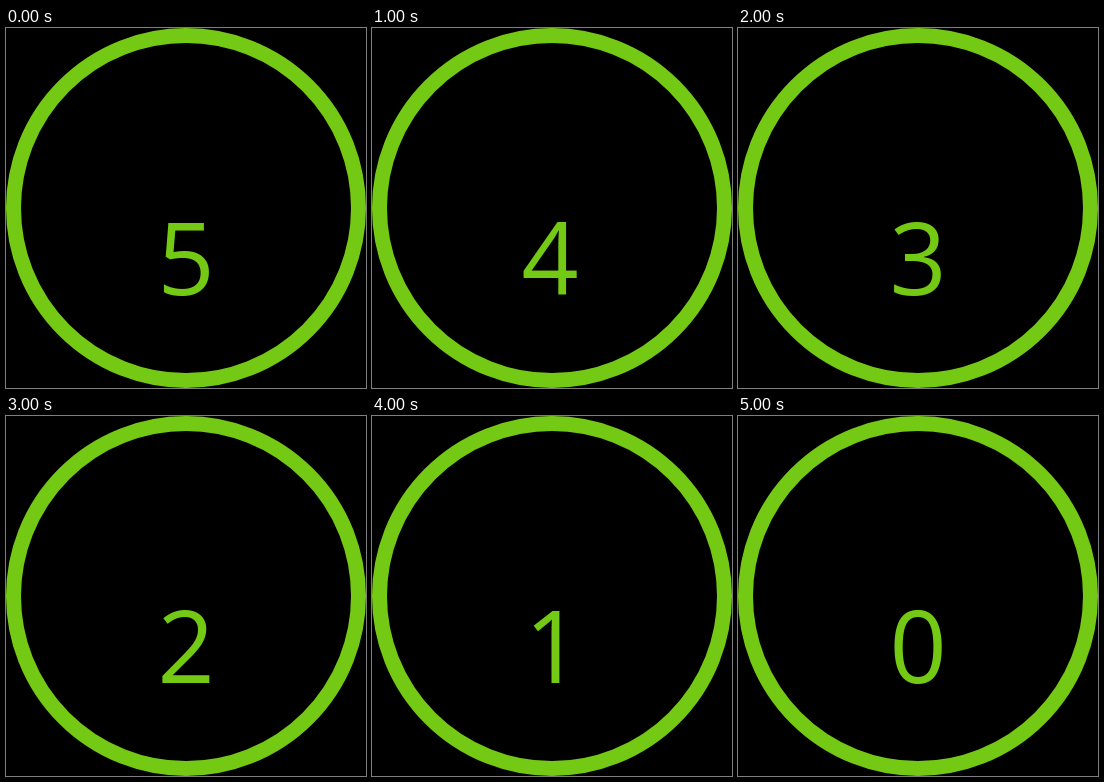
Animation of 360 by 360 pixels, one loop 6000 ms. Source, as an HTML page:

```html
<!DOCTYPE html>
<html lang="en">
<head>
<meta charset="utf-8">
<title>Countdown</title>
<style>
  html, body { margin: 0; width: 100%; height: 100%; overflow: hidden; background: #000; }
  svg { display: block; width: 100vw; height: 100vh; }
  circle { fill: none; stroke: #73c914; stroke-width: 15; }
  text { fill: #73c914; font: 400 100px "Open Sans", "Noto Sans", sans-serif; text-anchor: middle; }
</style>
</head>
<body>
<svg viewBox="0 0 360 360">
  <circle id="ring" cx="180" cy="180" r="172.5"/>
  <text id="digit" x="180" y="267">5</text>
</svg>
<script>
  const SECOND = 1000, START = 5, LOOP = (START + 1) * SECOND, RING_ON = 800;
  const nudge = { 4: -2, 1: 1 }; // optical centring
  const ring = document.getElementById("ring");
  const digit = document.getElementById("digit");
  const began = performance.now();

  function draw(now) {
    const time = Math.max(0, now - began) % LOOP;
    const value = START - Math.floor(time / SECOND);
    const lit = value === 0 || time % SECOND < RING_ON;
    ring.setAttribute("visibility", lit ? "visible" : "hidden");
    digit.textContent = value;
    digit.setAttribute("x", 180 + (nudge[value] || 0));
    requestAnimationFrame(draw);
  }
  draw(began);
</script>
</body>
</html>
```
